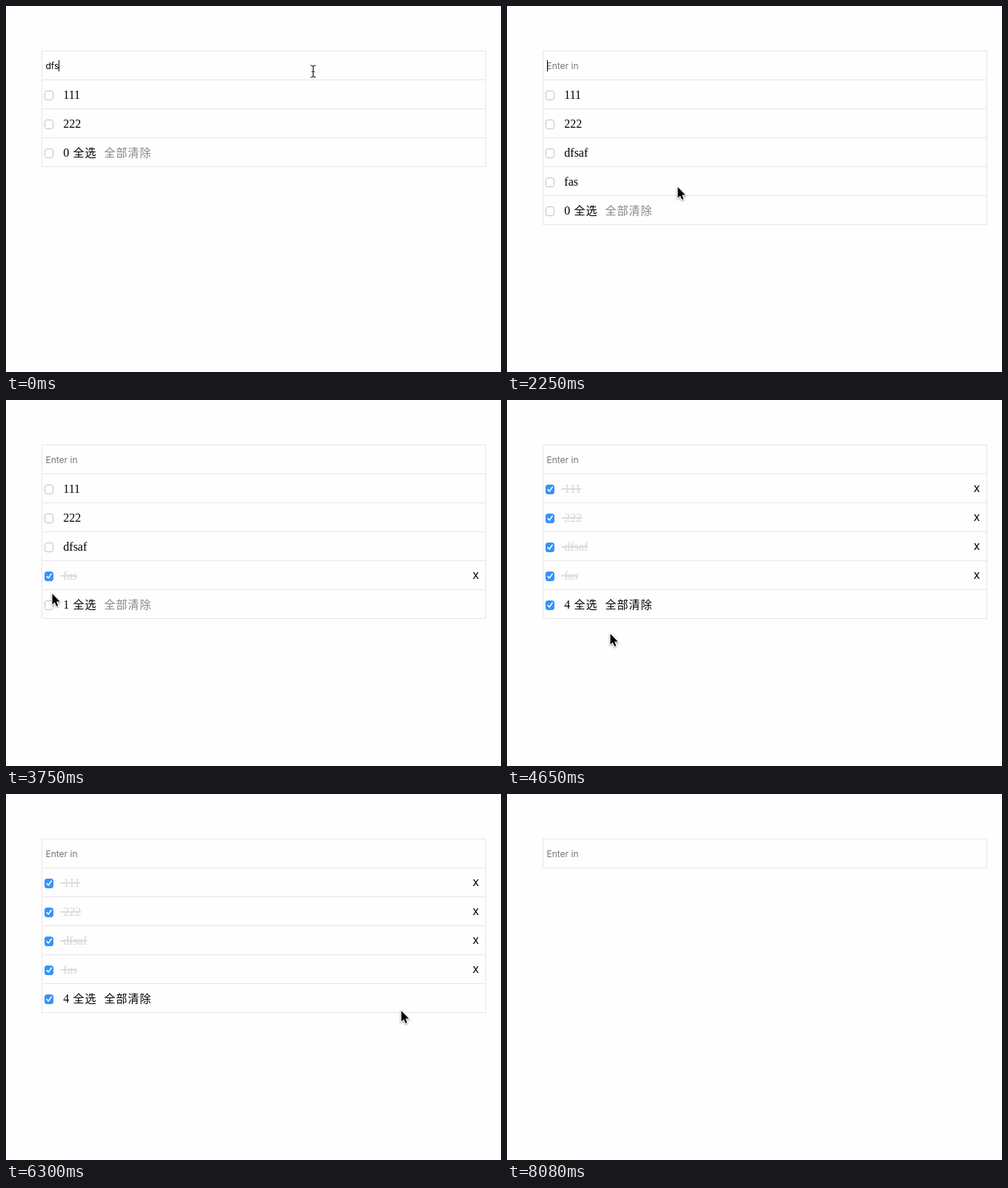
Write an HTML page that moves like this. It is 668x493 px and loops after 8830 ms.

```html
<!DOCTYPE html>
<html lang="zh">
<head>
<meta charset="utf-8">
<title>Todo list</title>
<style>
html, body { margin: 0; width: 100%; height: 100%; overflow: hidden; background: #fefefe; }
svg { display: block; }
.line { fill: none; stroke: #e6e6e6; }
.ui { font: 12px Inter, sans-serif; }
.hint { fill: #757575; }
.item { font: 16px "Liberation Serif", serif; }
.label { font: 15px "Noto Sans CJK SC", "Noto Sans CJK", sans-serif; letter-spacing: 1px; }
.done { fill: #d6d6d6; text-decoration: line-through; }
.muted { fill: #858585; }
.remove { font-weight: 500; text-anchor: middle; }
.box { fill: #fff; stroke: #c2c2c2; }
.box.on { fill: #3693f8; stroke: #3693f8; }
.tick { fill: none; stroke: #fff; stroke-width: 1.5; stroke-linecap: round; stroke-linejoin: round; }
.arrow { stroke: #fff; stroke-width: 2; paint-order: stroke; filter: drop-shadow(0 1px 1px #0006); }
.beam { fill: none; stroke: #222; stroke-width: 1.2; }
</style>
</head>
<body>
<svg id="stage" width="668" height="493" viewBox="0 0 668 493"></svg>
<script>
const LOOP = 8830, STEP = 150, BLINK = 450;
const LEFT = 48, WIDTH = 600, TOP = 60, ROW = 39;
const IDLE = 1800, CHECK_ONE = 3300, CHECK_ALL = 4050, CLEAR = 7040, END = 8080;
const stage = document.getElementById('stage');
const measure = document.createElement('canvas').getContext('2d');
measure.font = '12px Inter, sans-serif';

const todos = [
  { text: '111', added: 0, checked: CHECK_ALL },
  { text: '222', added: 0, checked: CHECK_ALL },
  { text: 'dfsaf', typed: -STEP, added: 600, checked: CHECK_ALL },
  { text: 'fas', typed: 900, added: 1200, checked: CHECK_ONE }
];

// Where the pointer turns; it moves evenly in between.
const turns = [
  { t: IDLE - STEP, x: 414, y: 88 },
  { t: 2250, x: 230, y: 244 },
  { t: 2700, x: 46, y: 279 },
  { t: CHECK_ONE, x: 57, y: 239 },
  { t: 3750, x: 62, y: 261 },
  { t: 4350, x: 60, y: 275 },
  { t: 4650, x: 139, y: 315 },
  { t: 5400, x: 590, y: 488 },
  { t: 6000, x: 562, y: 421 },
  { t: 6300, x: 533, y: 292 },
  { t: 6890, x: 178, y: 281 },
  { t: 7640, x: 176, y: 283 },
  { t: 7940, x: 492, y: 475 }
];

function pointerAt(t) {
  const next = turns.findIndex(turn => turn.t > t);
  if (next < 1) return next ? turns.at(-1) : turns[0];
  const a = turns[next - 1], b = turns[next];
  const k = (t - a.t) / (b.t - a.t);
  return { x: Math.round(a.x + (b.x - a.x) * k), y: Math.round(a.y + (b.y - a.y) * k) };
}

function pointer(t) {
  const away = t >= 5550 && t < 6000;
  if (away || t >= END) return '';
  const { x, y } = pointerAt(t - (t + (t >= 6890 ? 10 : 0)) % STEP);
  const shape = t < IDLE
    ? '<path class="beam" d="M-3.5-8Q0-8 0-5.5Q0-8 3.5-8M0-6V6M-3.5 8Q0 8 0 5.5Q0 8 3.5 8M-2 .5H2"/>'
    : '<path class="arrow" d="M0 0V14.5L3.3 11.4 5.6 16.8 7.8 15.9 5.6 10.6H10.2Z"/>';
  return `<g transform="translate(${x + .5} ${y})">${shape}</g>`;
}

const frame = y => `<rect class="line" x="${LEFT + .5}" y="${y + .5}" width="${WIDTH - 1}" height="${ROW}"/>`;

function checkbox(y, on) {
  const mark = on ? `<path class="tick" d="M55 ${y + 21.5}l2.2 2.5 4-5.8"/>` : '';
  return `<rect class="box${on ? ' on' : ''}" x="52.5" y="${y + 15.5}" width="11" height="12" rx="2.6"/>${mark}`;
}

function todoRow(text, y, done) {
  const remove = done ? `<text class="ui remove" x="634" y="${y + 25}">X</text>` : '';
  return frame(y) + checkbox(y, done) +
    `<text class="item${done ? ' done' : ''}" x="73.3" y="${y + 25.5}">&#160;${text}</text>` + remove;
}

function footer(y, count, all) {
  return frame(y) + checkbox(y, all) +
    `<text class="item" x="77.3" y="${y + 25.5}">${count}</text>` +
    `<text class="label" x="90.5" y="${y + 26}">全选</text>` +
    `<text class="label${all ? '' : ' muted'}" x="132.5" y="${y + 26}">全部清除</text>`;
}

// Typing adds two letters per step after the first one.
function input(t) {
  const draft = todos.find(todo => todo.typed <= t && t < todo.added);
  const text = draft ? draft.text.slice(0, 1 + 2 * Math.floor((t - draft.typed) / STEP)) : '';
  const caretShown = t < IDLE || (t < CHECK_ONE && Math.floor((t - IDLE) / BLINK) % 2);
  const caretX = Math.floor(54 + measure.measureText(text).width) + .5;
  return frame(TOP) +
    `<text class="ui${text ? '' : ' hint'}" x="53.5" y="85">${text || 'Enter in'}</text>` +
    (caretShown ? `<path stroke="#000" d="M${caretX} 73V88"/>` : '');
}

function render(t) {
  const shown = t < CLEAR ? todos.filter(todo => todo.added <= t) : [];
  const done = shown.filter(todo => todo.checked <= t).length;
  let y = TOP, svg = input(t);
  for (const todo of shown) svg += todoRow(todo.text, y += ROW, todo.checked <= t);
  if (shown.length) svg += footer(y + ROW, done, done === shown.length);
  return svg + pointer(t);
}

let current = '';
const start = performance.now();
function draw() {
  const next = render((performance.now() - start) % LOOP);
  if (next !== current) stage.innerHTML = current = next;
  requestAnimationFrame(draw);
}
draw();
</script>
</body>
</html>
```
